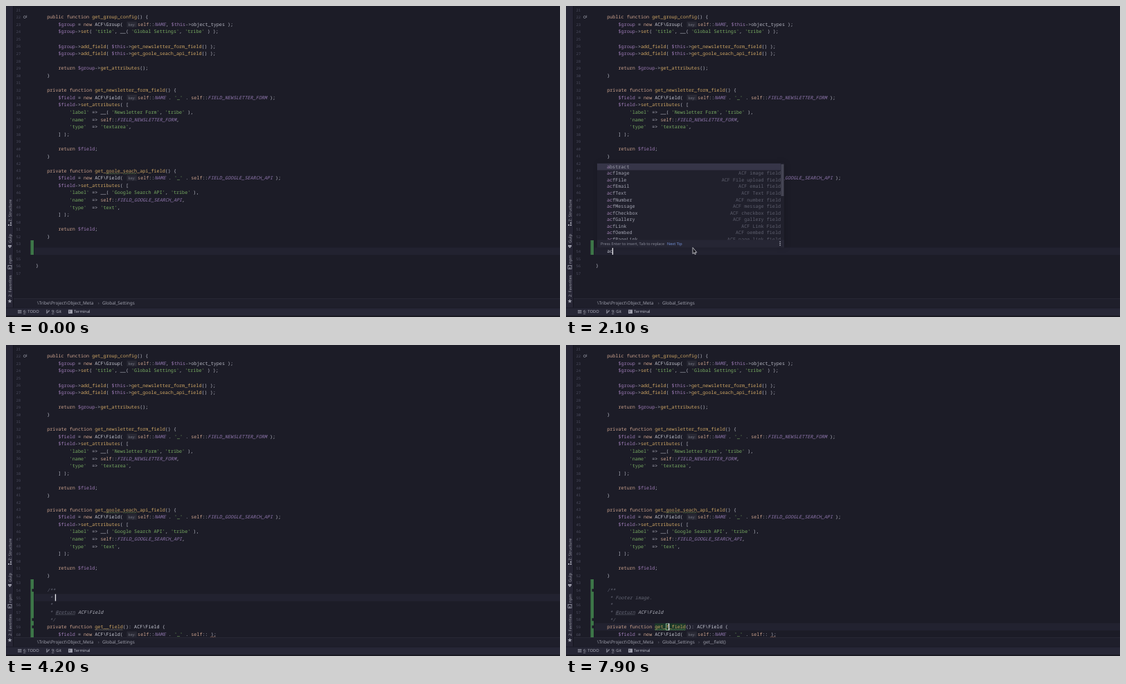
An HTML page with a canvas that plays this animation: 800 by 450 pixels, repeating every 8 s.

```html
<!DOCTYPE html>
<html lang="en">
<head>
<meta charset="utf-8">
<title>Code editor</title>
<style>
html, body { margin: 0; width: 100%; height: 100%; overflow: hidden; background: #1c1c28; }
canvas { display: block; width: 800px; height: 450px; }
</style>
</head>
<body>
<canvas id="stage" width="800" height="450"></canvas>
<script>
const ctx = document.getElementById('stage').getContext('2d');
const MONO = '"Noto Sans Mono", "DejaVu Sans Mono", monospace';
const SANS = '"Noto Sans", "Open Sans", sans-serif';
const LOOP = 8000, CW = 4.06, LH = 10.59, X0 = 43, SIZE = 6.77, HINT = 17.2;

const C = {
  bg: '#1c1c27', panel: '#262534', row: '#222230', number: '#4e4e61', green: '#3d7648',
  plain: '#b4b5c1', keyword: '#cba18c', fn: '#d0a765', variable: '#9d7bb6',
  constant: '#9077ae', string: '#78ab62', comment: '#646674', ui: '#9fa0ad', caret: '#f0f0f5',
  type: '#c6c7d2'
};

const rowY = n => 16 + (n - 22) * LH;
const colX = c => X0 + c * CW;

function rect(x, y, w, h, color) {
  ctx.fillStyle = color;
  ctx.fillRect(x, y, w, h);
}

function text(s, x, y, color, font, align = 'left') {
  ctx.font = font;
  ctx.fillStyle = color;
  ctx.textAlign = align;
  ctx.fillText(s, x, y + 2.3);
}

const mono = (s, x, y, color, style = '400', align) =>
  text(s, x, y, color, `${style} ${SIZE}px ${MONO}`, align);
const sans = (s, x, y, color, size, align) => text(s, x, y, color, `${size}px ${SANS}`, align);

function path(points, color, width = 0.8) {
  ctx.strokeStyle = color;
  ctx.lineWidth = width;
  ctx.beginPath();
  points.forEach(([x, y], i) => i ? ctx.lineTo(x, y) : ctx.moveTo(x, y));
  ctx.stroke();
}

function box(x, y, w, h, color, width = 0.8) {
  ctx.strokeStyle = color;
  ctx.lineWidth = width;
  ctx.strokeRect(x, y, w, h);
}

// Each rule: pattern, colour, font style
const RULES = [
  [/^'[^']*'/, C.string, '400'],
  [/^(public|private|function|new|return|self)\b/, C.keyword, '500'],
  [/^\$\w+/, C.variable, '400'],
  [/^ACF\\\w+/, C.type, '500'],
  [/^[A-Z][A-Z_]+\b/, C.constant, 'italic 400'],
  [/^object_types\b/, C.plain, '500'],
  [/^[a-z]\w*/, C.fn, '400'],
  [/^_+/, C.plain, '400'],
  [/^ +/, C.plain, '400'],
  [/^[^\w\s'$~]+/, C.plain, '400']
];

function hint(x, y) {
  rect(x + 1.5, y - 4, 14.5, 8, '#292934');
  sans('key:', x + 3.5, y - 0.2, '#71737f', 5.6);
}

// "~" stands for an inlay hint
function code(n, col, src) {
  const y = rowY(n);
  let x = colX(col), rest = src;
  while (rest) {
    if (rest[0] === '~') {
      hint(x, y);
      x += HINT;
      rest = rest.slice(1);
      continue;
    }
    const [pattern, color, style] = RULES.find(rule => rule[0].test(rest));
    const token = rest.match(pattern)[0];
    mono(token, x, y, color, style);
    x += token.length * CW;
    rest = rest.slice(token.length);
  }
}

function fieldMethod(n, name, constant, label, type) {
  [
    [4, `private function ${name}() {`],
    [8, `$field = new ACF\\Field( ~self::NAME . '_' . self::${constant} );`],
    [8, '$field->set_attributes( ['],
    [12, `'label' => __( '${label}', 'tribe' ),`],
    [12, `'name'  => self::${constant},`],
    [12, `'type'  => '${type}',`],
    [8, '] );'],
    [0, ''],
    [8, 'return $field;'],
    [4, '}']
  ].forEach(([col, src], i) => code(n + i, col, src));
}

function wave(x1, x2, y, color) {
  const points = [];
  for (let x = x1, i = 0; x <= x2; x += 1.3, i++) points.push([x, y + (i % 2 ? 0.5 : -0.5)]);
  path(points, color, 0.6);
}

function baseCode() {
  code(22, 4, 'public function get_group_config() {');
  code(23, 8, '$group = new ACF\\Group( ~self::NAME, $this->object_types );');
  code(24, 8, "$group->set( 'title', __( 'Global Settings', 'tribe' ) );");
  code(26, 8, '$group->add_field( $this->get_newsletter_form_field() );');
  code(27, 8, '$group->add_field( $this->get_goole_seach_api_field() );');
  code(29, 8, 'return $group->get_attributes();');
  code(30, 4, '}');
  fieldMethod(32, 'get_newsletter_form_field', 'FIELD_NEWSLETTER_FORM', 'Newsletter Form', 'textarea');
  fieldMethod(43, 'get_goole_seach_api_field', 'FIELD_GOOGLE_SEARCH_API', 'Google Search API', 'text');
  wave(colX(25), colX(30), 242.5, '#7f9a58');
  wave(colX(31), colX(36), 242.5, '#7f9a58');
}

function caret(x, n) {
  rect(x - 0.6, rowY(n) - 5, 1.3, 10, C.caret);
}

function typedCount(t) {
  const steps = [[5400, 1], [5500, 2], [5600, 3], [5700, 4], [5800, 5], [5900, 6], [6200, 7],
    [6500, 8], [6600, 9], [6700, 10], [6900, 12], [7200, 13]];
  return steps.reduce((n, [at, count]) => t >= at ? count : n, 0);
}

function template(t) {
  const ready = t >= 3500, naming = t >= 7400, letter = t >= 7800 ? 'f' : '';
  const doc = C.comment, slant = 'italic 400';
  const typed = 'Footer image.'.slice(0, typedCount(t));
  mono('/**', colX(4), rowY(54), doc, slant);
  [55, 56, 57].forEach(n => mono('*', colX(5), rowY(n), doc, slant));
  mono('*/', colX(5), rowY(58), doc, slant);
  mono('@return', colX(7), rowY(57), doc, slant);
  path([[colX(7), 390], [colX(14), 390]], doc, 0.6);
  mono('ACF\\Field', colX(15), rowY(57), ready ? '#b0b1bc' : doc, ready ? 'italic 500' : slant);
  mono(typed, colX(7), rowY(55), doc, slant);

  if (naming) {
    rect(colX(21), rowY(59) - 5, (10 + letter.length) * CW, 10, '#1d3a2b');
    if (letter) box(colX(25), rowY(59) - 4.6, CW, 9.2, '#8fc39c', 0.8);
  }
  const name = `get_${letter}_field`;
  code(59, 4, `private function ${name}(): ACF\\Field {`);
  if (ready) wave(colX(21), colX(21 + name.length), 412, naming ? '#74a66d' : '#85857c');
  code(60, 8, `$field = new ACF\\Field( ${ready ? '~' : ''}self::NAME . '_' . self:: );`);
  if (ready) wave(295, 303, 422.4, '#a9725b');

  if (naming) {
    caret(colX(25 + letter.length), 59);
  } else {
    const x = colX(7 + typed.length);
    if (typed) box(colX(7) - 0.5, rowY(55) - 5, x - colX(7) + 0.5, 10, '#5263a0');
    if (t < 4400 || t >= 4800) caret(x, 55);
  }
}

const ITEMS = [
  ['abstract', ''], ['acfImage', 'ACF image field'], ['acfFile', 'ACF File upload field'],
  ['acfEmail', 'ACF email field'], ['acfText', 'ACF Text Field'], ['acfNumber', 'ACF number field'],
  ['acfMessage', 'ACF message field'], ['acfCheckbox', 'ACF checkbox field'],
  ['acfGallery', 'ACF gallery field'], ['acfLink', 'ACF Link Field'],
  ['acfOembed', 'ACF oembed field'], ['acfPageLink', 'ACF page link field'],
  ['acfRadio', 'ACF radio field']
];

function popup(prefix) {
  const fuzzy = new RegExp('^' + [...prefix].join('.*'));
  ctx.save();
  ctx.shadowColor = 'rgba(0,0,0,.15)';
  ctx.shadowBlur = 8;
  ctx.shadowOffsetX = 2;
  rect(45, 227, 270, 122.5, '#20202c');
  ctx.restore();
  rect(45, 228, 265, 9.5, '#363548');
  ctx.save();
  ctx.beginPath();
  ctx.rect(45, 227, 270, 111.5);
  ctx.clip();
  ITEMS.filter(([name]) => fuzzy.test(name)).slice(0, 12).forEach(([name, info], i) => {
    const y = 232.5 + i * 9.55;
    const n = name.startsWith(prefix) ? prefix.length : 1;
    mono(name.slice(0, n), 59, y, '#a886b8', '500');
    mono(name.slice(n), 59 + n * CW, y, '#a3a4b2', '500');
    mono(info, 310, y, '#5e5f6e', '400', 'right');
  });
  rect(310.5, 229, 4, 46, '#454554');
  ctx.restore();
  rect(45, 338.5, 270, 11, '#262634');
  sans('Press Enter to insert, Tab to replace', 50, 343.5, '#858795', 5.57);
  sans('Next Tip', 146, 343.5, '#7390d6', 5.57);
  for (let i = -1; i < 2; i++) rect(308.5, 343 + i * 2.5, 1.3, 1.3, '#c3c5d2');
}

function vertical(s, y, size = 5.9) {
  ctx.save();
  ctx.translate(5.2, y);
  ctx.rotate(-Math.PI / 2);
  sans(s, 0, 0, C.ui, size);
  ctx.restore();
}

function star(x, y, r) {
  ctx.fillStyle = C.ui;
  ctx.beginPath();
  for (let i = 0; i < 10; i++) {
    const a = i * Math.PI / 5 - Math.PI / 2, d = i % 2 ? r * 0.42 : r;
    ctx.lineTo(x + d * Math.cos(a), y + d * Math.sin(a));
  }
  ctx.fill();
}

function gutter(t) {
  const open = t >= 3200;
  for (let n = 21; n <= (open ? 60 : 57); n++) {
    text(String(n), 21, rowY(n) - 0.2, C.number, `5.2px ${MONO}`, 'right');
  }
  ctx.strokeStyle = '#8d8e9a';
  ctx.lineWidth = 0.7;
  ctx.beginPath();
  ctx.arc(27, 16, 1.7, 0, 7);
  ctx.stroke();
  path([[29.7, 17], [29.7, 13.5]], '#8d8e9a', 0.7);
  rect(35.5, 339, 4.5, open ? 84 : 21, C.green);
  // Fold handles
  if (t >= 3500) [54, 58, 59].forEach(n => rect(37.5, rowY(n) - 2, 4, 4, C.bg));
}

function frameBars(t) {
  rect(0, 0, 10, 437, C.panel);
  rect(10, 0, 1, 437, '#161620');
  vertical('Z: Structure', 312);
  rect(3, 316, 2, 2, C.ui);
  rect(6, 316, 2, 2, C.ui);
  rect(6, 313, 2, 2, C.ui);
  vertical('Gulp', 343);
  rect(3, 346, 5, 2.2, C.ui);
  rect(4.5, 348, 2, 2, C.ui);
  vertical('npm', 373);
  box(3, 375.5, 5, 5, C.ui);
  rect(5, 378, 1, 2.5, C.ui);
  vertical('2: Favorites', 421);
  star(5.5, 427, 3.3);

  rect(11, 423, 789, 14, '#1f1f2b');
  rect(11, 423, 789, 0.8, '#2b2b38');
  sans('\\Tribe\\Project\\Object_Meta', 45, 430, C.ui, 6.45);
  sans('›', 132.8, 429.5, '#71727f', 6.45);
  sans('Global_Settings', 139, 430, C.ui, 6.45);
  if (t >= 7400) {
    sans('›', 191, 429.5, '#71727f', 6.45);
    sans('get__field()', 198, 430, C.ui, 6.45);
  }

  rect(0, 436.5, 800, 11.5, '#272736');
  rect(0, 436.5, 800, 0.8, '#181822');
  rect(0, 448, 800, 2, '#191922');
  for (let y = 440; y < 445; y += 1.8) rect(17, y, 5.5, 0.9, C.ui);
  sans('6: TODO', 25, 442, '#b1b2bd', 5.77);
  path([[25, 445.5], [28.2, 445.5]], C.ui, 0.6);
  path([[59, 439.5], [59, 445]], C.ui, 1);
  path([[62, 440], [62, 442], [59, 443.5]], C.ui, 1);
  sans('9: Git', 66, 442, '#b1b2bd', 5.77);
  path([[66, 445.5], [69.2, 445.5]], C.ui, 0.6);
  rect(90, 439.5, 6, 5.5, C.ui);
  path([[91, 440.7], [92.5, 442], [91, 443.3]], '#272735', 0.7);
  sans('Terminal', 98, 442, '#b1b2bd', 5.77);
}

function ibeam(x, y) {
  path([[x, y - 4], [x, y + 4]], '#d8d8de', 1);
  path([[x - 2, y - 4.2], [x + 2, y - 4.2]], '#d8d8de', 0.9);
  path([[x - 2, y + 4.2], [x + 2, y + 4.2]], '#d8d8de', 0.9);
}

function arrow(x, y) {
  const shape = new Path2D(`M${x} ${y}v9l2-1.7 1.2 2.7 1.3-.6-1.2-2.5h2.5z`);
  ctx.fillStyle = '#15151c';
  ctx.fill(shape);
  ctx.strokeStyle = '#d8d8de';
  ctx.lineWidth = 0.8;
  ctx.stroke(shape);
}

// Eased quadratic curve from a to c between two times
function glide(t, from, to, a, b, c) {
  const k = Math.min(1, (t - from) / (to - from));
  const p = k * k * (3 - 2 * k), q = 1 - p;
  return [0, 1].map(i => q * q * a[i] + 2 * p * q * b[i] + p * p * c[i]);
}

function pointer(t) {
  if (t < 100 || t >= 3200) return;
  if (t >= 2000) return arrow(183, 349.5);
  const pos = t < 500 ? glide(t, 100, 500, [3, 443], [190, 330], [324, 168])
    : t < 1000 ? glide(t, 500, 900, [324, 168], [170, 250], [82.5, 352.5])
    : glide(t, 1000, 1700, [82.5, 352.5], [135, 302], [184.5, 355]);
  ibeam(...pos);
}

function draw(t) {
  const open = t >= 3200;
  const row = t >= 7400 ? 59 : open ? 55 : 54;
  rect(0, 0, 800, 450, C.bg);
  rect(41, rowY(row) - 5.3, 759, LH, C.row);
  gutter(t);
  baseCode();
  if (open) {
    template(t);
  } else {
    code(56, 0, '}');
    const typed = 'acf'.slice(0, Math.max(0, Math.floor((t - 1900) / 100)));
    mono(typed, colX(4), rowY(54), C.type, '500');
    if (t >= 1500) caret(colX(4 + typed.length), 54);
    if (typed) popup(typed);
  }
  frameBars(t);
  pointer(t);
}

ctx.textRendering = 'geometricPrecision';
let start;
function tick(now) {
  start ??= now;
  draw(Math.floor((now - start) % LOOP / 100) * 100);
  requestAnimationFrame(tick);
}
draw(0);
requestAnimationFrame(tick);
</script>
</body>
</html>
```
